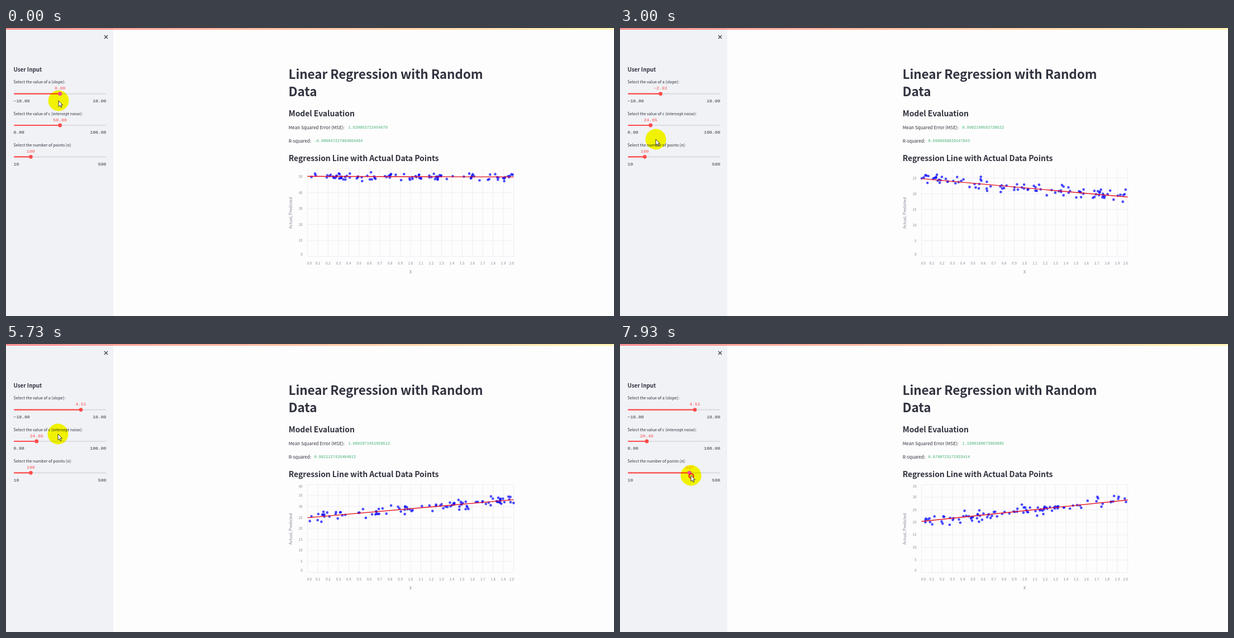
An HTML page for the animation above (8000 ms loop, 1088 px wide and 515 px high).

```html
<!DOCTYPE html>
<html lang="en">
<head>
<meta charset="utf-8">
<title>Linear Regression with Random Data</title>
<style>
html, body { margin: 0; width: 1088px; height: 515px; overflow: hidden; background: #fdfdfd; }
svg { display: block; }
text { font-family: "Noto Sans CJK JP", "Noto Sans CJK SC", "Noto Sans CJK", "Open Sans", sans-serif; fill: #31333f; white-space: pre; }
.h1 { font-size: 22.55px; font-weight: 700; letter-spacing: -.005em; }
.h2 { font-size: 14px; font-weight: 600; letter-spacing: -.005em; }
.h3 { font-size: 9.9px; font-weight: 600; }
.body { font-size: 8.06px; }
.label { font-size: 7.13px; }
.mono { font-family: "Liberation Mono", monospace; font-size: 8.05px; }
.value { fill: #ff4b4b; text-anchor: middle; }
.code { font-family: "Liberation Mono", monospace; font-size: 6.9px; fill: #3fae6e; }
.tick { font-size: 6.08px; fill: #808495; }
.axis { font-size: 7.1px; fill: #808495; text-anchor: middle; }
.end { text-anchor: end; }
.mid { text-anchor: middle; }
.grid { stroke: #e7e7f3; stroke-width: .7; }
.dot { fill: #00f; fill-opacity: .7; }
.fit { stroke: #e5121f; stroke-width: 1.4; }
#halo { mix-blend-mode: multiply; fill: #ff0; }
</style>
</head>
<body>
<svg id="stage" width="1088" height="515" viewBox="0 0 1088 515">
  <defs>
    <linearGradient id="bar"><stop stop-color="#ff4b4b"/><stop offset="1" stop-color="#ffec80"/></linearGradient>
  </defs>
  <rect width="192" height="515" fill="#f0f2f6"/>
  <rect y=".8" width="1088" height="1.7" fill="url(#bar)"/>
  <path d="M176 13l6 6m0-6l-6 6" stroke="#31333f" stroke-width="1.1"/>
  <text class="h3" x="13.4" y="77.7">User Input</text>
  <text class="h1" x="505.6" y="91.4">Linear Regression with Random</text>
  <text class="h1" x="505.6" y="122">Data</text>
  <text class="h2" x="505.8" y="157.5">Model Evaluation</text>
  <text class="body" x="505.8" y="180.9">Mean Squared Error (MSE):</text>
  <text class="body" x="505.8" y="204.7">R-squared:</text>
  <text class="h2" x="505.8" y="238.3">Regression Line with Actual Data Points</text>
  <g id="charts"></g>
  <g id="sliders"></g>
  <g id="runner" fill="none" stroke="#8b8d96" stroke-width="1.5">
    <circle cx="1078.5" cy="10.2" r="1.4" fill="#8b8d96" stroke="none"/>
    <path d="M1073.5 13h10M1076.9 13v8M1080.1 13v8M1077 15h3"/>
  </g>
  <circle id="halo" r="18.5"/>
  <circle id="hot" r="3.4" fill="#f5489a"/>
  <g id="pointer">
    <circle id="ring" cx=".5" cy="1" r="4" fill="none" stroke="#f01818" stroke-width="2"/>
    <path id="arrow" d="M0 0V10.5L2.5 8.3 4.2 12.1 5.9 11.4 4.3 7.6H7.5Z" fill="#fff" stroke="#111" stroke-width=".8"/>
    <path id="hand" d="M-3.5 1L-4.8-.8q-.6-1.4.8-1.4L-2.6-.6V-4q.8-1.4 1.6 0V-5q.9-1.2 1.7 0V-4.5q.9-1 1.6 0V-3q.9-.8 1.5.2V2L2.6 5.5H-1.6Z" fill="#fff" stroke="#111" stroke-width=".8"/>
  </g>
</svg>
<script>
const LOOP = 8000;
const $ = id => document.getElementById(id);
const clamp = (v, lo, hi) => Math.min(hi, Math.max(lo, v));
const show = (node, on) => node.setAttribute('visibility', on ? 'visible' : 'hidden');

function add(parent, tag, attrs, content) {
  const node = document.createElementNS('http://www.w3.org/2000/svg', tag);
  for (const k in attrs) node.setAttribute(k, attrs[k]);
  if (content !== undefined) node.textContent = content;
  parent.appendChild(node);
  return node;
}
const label = (parent, cls, x, y, content) => add(parent, 'text', { class: cls, x, y }, content);

function seeded(s) {
  return () => {
    s = s + 0x6d2b79f5 | 0;
    let r = Math.imul(s ^ s >>> 15, 1 | s);
    r = r + Math.imul(r ^ r >>> 7, 61 | r) ^ r;
    return ((r ^ r >>> 14) >>> 0) / 4294967296;
  };
}

// Charts: fit is the line's y at both ends
const LEFT = 539.5, RIGHT = 908.5, BASE = 408.5, TALL = 157, POINTS = 100;
const charts = [
  { from: 0, max: 55, step: 10, fit: [265.2, 266.4], mse: '1.620853722454679', r2: '-0.009647227894904464' },
  { from: 1250, max: 55, step: 10, fit: [264.8, 282], mse: '0.6292716688691812', r2: '0.8216413931222445' },
  { from: 2700, max: 28, step: 5, fit: [269.4, 302.2], mse: '0.9982190563738522', r2: '0.6990598829147043' },
  { from: 5200, max: 40, step: 5, fit: [310.6, 278.4], mse: '1.0861071451659512', r2: '0.9821127426404812' },
  { from: 6750, max: 35, step: 5, fit: [317.2, 279], mse: '1.1960180073693085', r2: '0.8700723172933414' },
];

// Normal noise around the line, as wide as the mean squared error says
function scatter(g, c, seed) {
  const random = seeded(seed), spread = Math.sqrt(c.mse) * TALL / c.max;
  for (let i = 0; i < POINTS; i++) {
    const u = random();
    const noise = Math.sqrt(-2 * Math.log(1 - random())) * Math.cos(2 * Math.PI * random());
    add(g, 'circle', {
      class: 'dot', r: 2.3,
      cx: LEFT + (RIGHT - LEFT) * u,
      cy: c.fit[0] + (c.fit[1] - c.fit[0]) * u + clamp(noise, -2.3, 2.3) * spread,
    });
  }
}

charts.forEach((c, n) => {
  const g = c.node = add($('charts'), 'g', {});
  label(g, 'code', 612.6, 180.4, c.mse);
  label(g, 'code', 551.6, 204.3, c.r2);
  for (let i = 0; i <= 20; i++) {
    const x = LEFT + (RIGHT - LEFT) * i / 20;
    add(g, 'line', { class: 'grid', x1: x, x2: x, y1: BASE - TALL, y2: BASE });
    label(g, 'tick mid', clamp(x, 543, 905), 423.2, (i / 10).toFixed(1));
  }
  for (let v = 0; v <= c.max; v += c.step) {
    const y = BASE - TALL * v / c.max;
    add(g, 'line', { class: 'grid', x1: LEFT, x2: RIGHT, y1: y, y2: y });
    label(g, 'tick end', 530.6, clamp(y, 255, 405) + 2.2, v);
  }
  scatter(g, c, n + 1);
  add(g, 'line', { class: 'fit', x1: LEFT, x2: RIGHT, y1: c.fit[0], y2: c.fit[1] });
  label(g, 'axis', 724, 439.4, 'X');
  add(g, 'text', { class: 'axis', transform: 'translate(512.4 330.5) rotate(-90)' }, 'Actual, Predicted');
});

// Sliders: each drag is [start, end, first value, last value]
const sliders = [
  { name: 'Select the value of a (slope):', y: 117.6, lo: -10, hi: 10, digits: 2,
    drags: [[350, 1000, 0, -2.92], [4150, 4950, -2.92, 4.51]] },
  { name: 'Select the value of c (intercept noise):', y: 174, lo: 0, hi: 100, digits: 2,
    drags: [[1850, 2450, 50, 24.65], [6050, 6450, 24.65, 20.49]] },
  { name: 'Select the number of points (n):', y: 230.3, lo: 10, hi: 500, digits: 0,
    drags: [[7350, 7930, 100, 337]] },
];
const X0 = 14, X1 = 179.3;

for (const s of sliders) {
  const g = $('sliders'), track = { x: X0, y: s.y - 1.1, height: 2.2, rx: 1 };
  label(g, 'label', 13.5, s.y - 18.5, s.name);
  add(g, 'rect', { ...track, width: X1 - X0, fill: '#dcdde2' });
  s.fill = add(g, 'rect', { ...track, fill: '#ff4b4b' });
  s.thumb = add(g, 'circle', { cy: s.y, r: 3.4, fill: '#ff4b4b' });
  s.text = label(g, 'mono value', 0, s.y - 7.5, '');
  label(g, 'mono', 13.6, s.y + 15.4, s.lo.toFixed(s.digits).replace('-', '\u2212'));
  label(g, 'mono end', 179.3, s.y + 15.4, s.hi.toFixed(s.digits));
}

// Pointer path: time, x, y
const path = [
  [0, 94, 130], [350, 96, 118], [1000, 72, 118.5], [1730, 95, 173], [1850, 96, 174], [2450, 54.5, 175],
  [3000, 64, 199], [4000, 69, 120], [4150, 72, 118.5], [4950, 133.5, 119.5], [5730, 93, 161],
  [6050, 54.7, 174], [6450, 47.8, 175], [7200, 44, 239], [7350, 44.5, 232], [7930, 127, 235], [LOOP, 127, 235],
];

function ease(t, a, b) {
  const u = clamp((t - a) / (b - a), 0, 1);
  return u * u * (3 - 2 * u);
}

function pointerAt(t) {
  const i = path.findIndex(p => p[0] > t);
  const [a, b] = [path[i - 1], path[i]], u = ease(t, a[0], b[0]);
  return [a[1] + (b[1] - a[1]) * u, a[2] + (b[2] - a[2]) * u];
}

function valueAt(drags, t) {
  return drags.reduce((v, [a, b, from, to]) => t < a ? v : from + (to - from) * ease(t, a, b), drags[0][2]);
}

function draw(t) {
  const [px, py] = pointerAt(t);
  let pressed = false, grab = false, hot = null;
  for (const s of sliders) {
    const v = valueAt(s.drags, t), x = X0 + (X1 - X0) * (v - s.lo) / (s.hi - s.lo);
    s.fill.setAttribute('width', x - X0);
    s.thumb.setAttribute('cx', x);
    s.text.setAttribute('x', x);
    s.text.textContent = v.toFixed(s.digits).replace('-', '\u2212');
    s.text.setAttribute('opacity', Math.hypot(px - x, py - s.y + 10) < 17 ? .55 : 1);
    const gap = Math.hypot(px - x, py - s.y);
    if (gap < 16) hot = [x, s.y];
    if (gap < 2.8) grab = true;
    if (s.drags.some(([a, b]) => t >= a && t < b + 70)) pressed = true;
  }
  const current = charts.filter(c => c.from <= t).pop();
  for (const c of charts) c.node.style.display = c === current ? '' : 'none';
  $('halo').setAttribute('cx', px);
  $('halo').setAttribute('cy', py);
  $('pointer').setAttribute('transform', `translate(${px} ${py})`);
  show($('hot'), hot && (pressed || !grab));
  if (hot) {
    $('hot').setAttribute('cx', hot[0]);
    $('hot').setAttribute('cy', hot[1]);
  }
  show($('ring'), pressed);
  show($('hand'), grab && !pressed);
  show($('arrow'), pressed || !grab);
  show($('runner'), t >= 6950 && t < 7350);
}

const start = performance.now();
function frame() {
  draw((performance.now() - start) % LOOP);
  requestAnimationFrame(frame);
}
frame();
</script>
</body>
</html>
```
